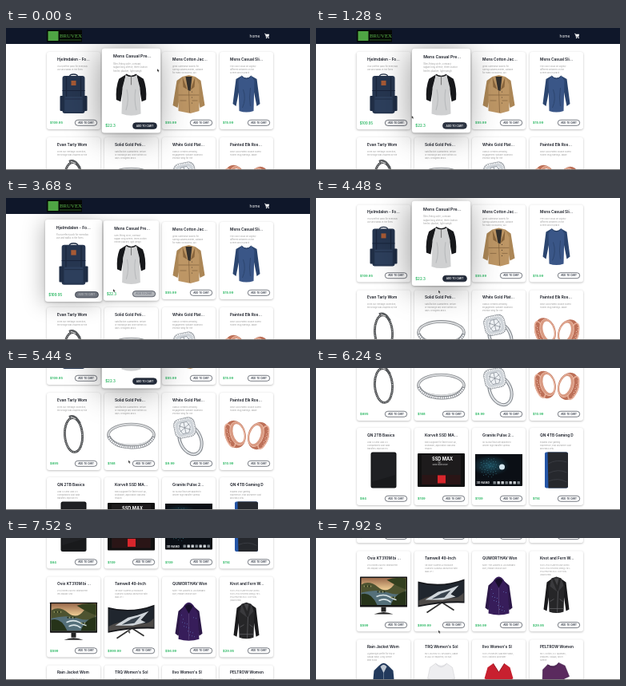
An HTML page that plays this animation: 380 px wide and 178 px high, repeating every 8 s.

```html
<!DOCTYPE html>
<html lang="en">
<head>
<meta charset="utf-8">
<title>Shop grid</title>
<style>
  html, body { margin: 0; width: 100%; height: 100%; overflow: hidden; background: #fff; }
  #stage { position: relative; width: 380px; height: 178px; overflow: hidden; background: #fff; font-family: Inter, "Open Sans", sans-serif; }
  #page { position: absolute; left: 0; top: 0; width: 380px; }
  #nav { position: absolute; left: 0; top: 0; z-index: 2; }
  .card { position: absolute; width: 67px; background: #fff; border-radius: 3px; }
  svg { display: block; overflow: visible; }
  .title { font-size: 4.8px; font-weight: 600; fill: #161a24; }
  .desc { font-size: 2.6px; fill: #999; }
  .price { font-size: 4.1px; font-weight: 600; fill: #1fb45a; }
  .btn { font-size: 2.9px; font-weight: 600; text-anchor: middle; }
  #cursor { position: absolute; left: 0; top: 0; z-index: 3; }
  #edge { position: absolute; left: 0; bottom: 0; width: 380px; height: 1px; background: #777; z-index: 4; }
</style>
</head>
<body>
<div id="stage">
  <div id="page">
    <svg id="nav" width="380" height="20">
      <defs>
        <radialGradient id="glow" cx=".32" cy=".45" r=".4"><stop offset="0" stop-color="#1d4f60"/><stop offset="1" stop-color="#0b0f15"/></radialGradient>
        <linearGradient id="sun" x2="0" y2="1"><stop offset="0" stop-color="#9a6a4c"/><stop offset=".45" stop-color="#f0cf96"/></linearGradient>
      </defs>
      <rect width="380" height="20" fill="#0f172a"/>
      <rect x="51" y="2.5" width="44" height="15" fill="#050805"/>
      <rect x="52.5" y="4" width="13" height="12" fill="#4fa544"/>
      <text x="67" y="12.4" font-family="Liberation Serif, serif" font-size="6.8" fill="#5cb84c">BRUVEX</text>
      <path d="M67 15H94" stroke="#4fa544" stroke-width=".5"/>
      <text x="304.5" y="11.8" font-size="4.9" fill="#fff">home</text>
      <path d="M323 7.3h1.3l1 4h3.2" fill="none" stroke="#fff" stroke-width=".7"/>
      <path d="M324.3 7.8h4.8l-.7 2.9h-3.3z" fill="#fff"/>
      <circle cx="325.6" cy="12.4" r=".7" fill="#fff"/>
      <circle cx="328.2" cy="12.4" r=".7" fill="#fff"/>
    </svg>
  </div>
  <svg id="cursor" width="6" height="6">
    <path id="arrow" d="M0 0V3.8L.9 3 1.6 4.4 2.2 4.1 1.6 2.8H2.8Z" fill="#222" stroke="#fff" stroke-width=".25"/>
    <path id="beam" d="M-.8-1.8H.8M0-1.8V1.8M-.8 1.8H.8" fill="none" stroke="#222" stroke-width=".6"/>
  </svg>
  <div id="edge"></div>
</div>
<script>
const LOOP = 8000;
const path = (d, fill, stroke = 'none', w = 0.6) =>
  `<path d="${d}" fill="${fill}" stroke="${stroke}" stroke-width="${w}"/>`;
const box = (x, y, w, h, fill, r = 0) =>
  `<rect x="${x}" y="${y}" width="${w}" height="${h}" rx="${r}" fill="${fill}"/>`;
const ring = (x, y, rx, ry, stroke, w, extra = '') =>
  `<ellipse cx="${x}" cy="${y}" rx="${rx}" ry="${ry}" fill="none" stroke="${stroke}" stroke-width="${w}" ${extra}/>`;
const dot = (x, y, r, fill) => `<circle cx="${x}" cy="${y}" r="${r}" fill="${fill}"/>`;
const label = (x, y, size, fill, s) =>
  `<text x="${x}" y="${y}" font-size="${size}" font-weight="700" fill="${fill}">${s}</text>`;
const turn = (x, y, deg, body) => `<g transform="translate(${x} ${y}) rotate(${deg})">${body}</g>`;
const many = (n, f) => Array.from({ length: n }, (_, i) => f(i)).join('');

// Pictures are drawn around their own centre.
const art = {
  pack: () => path('M-5-22Q-5-25 0-25T5-22', 'none', '#1d2b42', 1.3) +
    box(-14, -23, 28, 47, '#263650', 3) + box(-17, 2, 5, 19, '#1f2d45', 1) + box(12, 2, 5, 19, '#1f2d45', 1) +
    box(-14, -5, 28, 1, '#18233a') + box(-11, 3, 22, 19, '#2d3f5c', 1.5) +
    path('M-9-22V3M9-22V3', 'none', '#1a263c', 1.2) + box(-3, -17, 6, 6, '#a65a35') +
    path('M-11 6H11', 'none', '#18233a'),
  raglan: () => path('M-6-23L-14-18Q-18-8-17 6L-12 8-10-4ZM6-23L14-18Q18-8 17 6L12 8 10-4Z', '#17181b') +
    path('M-6-23Q0-20 6-23L10-8 11 22Q0 26-11 22L-10-8Z', '#cfd0d1') +
    path('M-6-23Q0-19 6-23', 'none', '#17181b', 1.4) + path('M0-21V-11', 'none', '#777', 1) +
    path('M-5-6Q-2 6-6 18M5-6Q3 6 6 18', 'none', '#b8babc', 1),
  coat: () => path('M-8-22L-15-17-20 14-14 17-11 2ZM8-22L15-17 20 14 14 17 11 2Z', '#ab8656') +
    path('M-8-22L0-24 8-22 13-12 13 21 2 24-13 21-13-12Z', '#bd9665') +
    path('M-4-22H4L2-4-1-5Z', '#33302d') + path('M-8-22L-2-6-7-9ZM8-22L2-5 7-9Z', '#8a663d') +
    path('M0-5L1 23M-11 8H-3M4 8H11M-13 1H13', 'none', '#80613d', .7) + many(3, i => dot(4, -3 + i * 7, .6, '#543')),
  sweater: () => path('M-6-23L-13-19-17 12-13 15-9-5ZM6-23L13-19 17 12 13 15 9-5Z', '#2b456f') +
    path('M-6-23Q0-18 6-23L10-17 9 21Q0 24-9 21L-10-17Z', '#3a5687') +
    path('M-6-23Q0-16 6-23', 'none', '#223758', 1) + path('M-4-6Q0 6-5 17M5-8Q3 5 5 15', 'none', '#2d466f', 1),
  bracelet: () => turn(0, 0, -4, ring(0, 0, 11, 21.5, '#3c3e40', 2.8) +
    ring(0, 0, 11, 21.5, '#b9bbbd', 1.6, 'stroke-dasharray="1 1.1"') +
    path('M-4-23Q2-25 6-19L9-14', 'none', '#55585b', 3) + path('M-2-23L4-20', 'none', '#d5d5d5', 1)),
  band: () => ring(0, 0, 28.5, 13.5, '#8b8e92', 3.6) + ring(0, -.4, 28.3, 13, '#d9dbdd', 2) +
    path('M-28 2Q-22 15 0 15.5T28 2', 'none', '#82868b', 4.2) +
    `<path d="M-28 3Q-21 15 0 15.5T28 3" fill="none" stroke="#f7f8fa" stroke-width="2.4" stroke-dasharray="1.8 .8"/>`,
  diamond: () => turn(2, 6, -24, ring(0, 0, 13, 19, '#80858b', 4) + ring(0, 0, 13, 19, '#dfe2e5', 2)) +
    turn(-5, -9, -12, box(-13.5, -12.5, 27, 25, '#8a9097', 8) +
      `<rect x="-12" y="-11" width="24" height="22" rx="7" fill="#cfd4d9" stroke="#fff" stroke-width="2" stroke-dasharray="1.2 1"/>` +
      box(-8, -7.5, 16, 15, '#eef1f4', 5) + path('M-7-4L7 4M-7 4L7-4M0-7V7M-4-7L-7 0-4 7 4 7 7 0 4-7Z', 'none', '#737b84', .6)),
  rose: () => [[-14, -1, -16, 3], [15, 1, 18, -3]].map(([x, y, deg, dx]) => turn(x, y, deg,
    `<ellipse rx="13" ry="17.5" fill="#bd7058"/>` + ring(-dx * 2.2, 0, 5.5, 15, '#e8b09a', 1.6) +
    `<ellipse cx="${dx}" rx="8.6" ry="14.5" fill="#d99a82"/><ellipse cx="${dx * 1.4}" rx="6.6" ry="12" fill="#fff"/>` +
    ring(dx, 0, 9, 15, '#f0c1ac', .9) + many(9, i => dot(-dx * 3 + i % 2, -10 + i * 2.5, .6, '#f3cdbd')))).join(''),
  drive: () => box(-16, -22.5, 32, 45, '#131416', 2.5) + box(-14.5, -21.5, 29, 43, '#1f2023', 2) +
    path('M-15 15L15 6V21H-15Z', '#191a1c'),
  ssd: () => box(-29.5, -21, 59, 42, '#111', 1) + box(-24.5, -19, 49, 37, '#1d1b1c') + path('M-24 6H24V18H-24Z', '#2a1516') +
    label(-11.5, -11.8, 5.6, '#fff', 'SSD MAX') + label(-11, -6, 2.4, '#aaa', 'Solid State Drive') + box(-4.5, 6.5, 10, 10, '#d8262c'),
  blue: () => box(-29.5, -20, 59, 40, '#0b0f15', 1) + box(-29.5, -20, 59, 32, 'url(#glow)') +
    many(44, i => dot(-12 + Math.sin(i * 2.4) * Math.sqrt(i) * 1.9, -3 + Math.cos(i * 2.4) * Math.sqrt(i) * 1.9, .4, '#58b3c6')) +
    dot(4, -4, 3.5, '#d5e6ee') + label(-28, 17.4, 3.6, '#e8eaec', '3D NAND') +
    many(7, i => box(-7 + i * 5, 14, 3.4, 3.6, i % 3 ? '#c9ced2' : '#7f878d', .5)),
  game: () => box(-14.5, -22.5, 29, 45, '#2455a6', 2) + path('M-11-22.5H12Q14.5-22.5 14.5-20V20Q14.5 22.5 12 22.5H-10Z', '#26282d') +
    path('M-10-8Q0-14 13-10M-10 4Q2-2 13 3M-10 14Q2 9 13 15', 'none', '#3b3e44', .9),
  screen: () => box(-29.5, -24, 59, 38, '#141414', .6) + box(-28, -22.5, 56, 34, 'url(#sun)') +
    path('M-28-14Q-18-20-7-11T13-14 28-20V2H-28Z', '#4d5330') + path('M-28-4Q-8-9 6-4T28-7V11.5H-28Z', '#55707a') +
    path('M-28-2Q-16-6-8 11.5H-28ZM28-6Q14-3 9 11.5H28Z', '#263319') + path('M4-20Q14-24 28-22V-8Q16-12 4-20Z', '#34401f') +
    path('M-9 1Q0-3 7 1T16 5M-6 6Q2 2 9 8', 'none', '#dbe6e8', 1.6) + many(14, i => dot(-24 + i * 17 % 49, -12 + i * 7 % 21, 1, i % 2 ? '#1f2a16' : '#8c8f5b')) +
    box(-3, 14, 6, 6, '#222') + path('M-12 23Q0 18 12 23Z', '#222'),
  curve: () => path('M-29-18Q0-10 29-21V9Q0 8-29 14Z', '#15161a') + path('M-28-16Q0-9 28-19V7Q0 6-28 12Z', '#20262e') +
    path('M-28 6Q-8-4 6 1T28-4V7Q0 6-28 12Z', '#4d4a48') + path('M-20 5L-4-5 8-8 22-13 12-2 18 1 2 5Z', '#cfd5da') +
    path('M-12 4L0-3 12-7 4 2Z', '#39434d') + path('M0 9L-18 21M2 9L16 18', 'none', '#333', 1.7),
  violet: () => path('M-5-20L-13-13-17 15-13 18-9 0ZM5-20L13-13 17 15 13 18 9 0Z', '#2c1848') +
    path('M-6-20Q0-28 6-20L11-10 13 22Q0 26-13 22L-11-10Z', '#371d5a') + path('M-5-19Q0-25 5-19L0-10Z', '#180e2b') +
    path('M0-10V23', 'none', '#655082', .6) + many(16, i => dot(-9 + i * 7 % 19, -8 + i * 11 % 28, .5, '#5d70b5')),
  leather: () => path('M-5-22L-12-17-16 17-12 19-9-2ZM5-22L12-17 16 17 12 19 9-2Z', '#1a1a1c') +
    path('M-6-22L0-24 6-22 10-12 9 20Q0 23-9 20L-10-12Z', '#262628') +
    path('M-6-22L-8-12 1-5ZM6-22L9-13 2-5Z', '#3a3a3d') + path('M2-6L1 21M-8 7L-3 4M8 7L4 4M-9 16H9', 'none', '#707074', .6) +
    path('M-3-22H3L1-13Z', '#454548'),
  rain: () => path('M-6-20Q0-27 6-20L12-14 15 18H-15L-12-14Z', '#22395c') + path('M-4-19Q0-24 4-19L0-11Z', '#bfc8d3') + path('M0-12V18', 'none', '#93a3b8', .6),
  tee: (c = '#eeeef0', s = '#d2d2d6') => path('M-7-23L-14-18-17-4-10-2-10 22H10V-2L17-4 14-18 7-23Q0-17-7-23Z', c, s, .6) + path('M-7-23Q0-14 7-23', 'none', s, .8),
  red: () => path('M-7-23L-14-18-18-4-11-1-10 22H10L11-1 18-4 14-18 7-23 0-12Z', '#c8202f') + path('M-7-23L0-12 7-23', 'none', '#8f1420', .9),
  plum: () => turn(0, 0, -10, art.tee('#5a2a5e', '#43204a'))
};

// title, price, picture, description lines split by |
const rows = [
  [['Hjelmdalen - Fo...', '109.95', 'pack', 'Your perfect pack for everyday|use and walks in the fores'],
   ['Mens Casual Pre...', '22.3', 'raglan', 'Slim-fitting style, contrast|raglan long sleeve, three-button|henley placket, light weigh'],
   ['Mens Cotton Jac...', '55.99', 'coat', 'great outerwear jackets for|Spring/Autumn/Winter, suitable|for many occasions, suc'],
   ['Mens Casual Sli...', '15.99', 'sweater', 'The color could be slightly|different between on the|screen and in practi']],
  [['Evan Tarly Wom', '695', 'bracelet', 'From our Heritage Collection,|the design was inspired by the'],
   ['Solid Gold Peti...', '168', 'band', 'Satisfaction Guaranteed. Return|or exchange any order within 30|days. Designed and s'],
   ['White Gold Plat...', '9.99', 'diamond', 'Classic Created Wedding|Engagement Solitaire Diamond|Promise Ring for Her'],
   ['Painted Elk Ros...', '10.99', 'rose', 'Rose Gold Plated Double Flared|Tunnel Plug Earrings. Made']],
  [['QN 2TB Basics', '64', 'drive', 'USB 3.0 and USB 2.0|Compatibility Fast data|transfers Improve PC'],
   ['Korvelt SSD MA...', '109', 'ssd', 'Easy upgrade for faster boot up,|shutdown, application load and|respon'],
   ['Granite Pulse 2...', '109', 'blue', '3D NAND flash are applied to|deliver high transfer speeds'],
   ['QN 4TB Gaming D', '114', 'game', 'Expand your gaming|experience, Play anywhere Fast|and easy setu']],
  [['Ovix KT310M bi ...', '599', 'screen', '21.5 inches Full HD widescreen|IPS display And'],
   ['Tamwell 49-Inch', '999.99', 'curve', '49 INCH SUPER ULTRAWIDE|CURVED GAMING MONITOR with|dual 27 i'],
   ['QUMORTHAV Won', '56.99', 'violet', 'Note: The Jackets is US standard|size, Please choose size'],
   ['Knot and Fern W...', '29.95', 'leather', '100% POLYURETHANE (shell)|100% POLYESTER (lining) 75%|POLYESTER 25% COTTON|(SWEATER)']],
  [['Rain Jacket Wom', '39.99', 'rain', 'Lightweight perfet for trip or|casual wear, Long sleeve|with hood'],
   ["TRQ Women's Sol", '9.85', 'tee', '95% RAYON 5% SPANDEX, Made|in USA or Imported, Do Not'],
   ["Ilvo Women's Sl", '7.95', 'red', '100% Polyester, Machine wash,|100% cationic polyester'],
   ['PELTROW Women', '12.99', 'plum', '95% Cotton, 5% Spandex,|Features: Casual, Short|Sleeve']]
];
const tops = [30, 136.5, 243, 349.5, 460.5];
const page = document.getElementById('page');

function makeCard(item, r, c) {
  const [title, price, pic, text] = item;
  const extra = r === 3 ? 4 : 0, h = 97 + extra;
  const el = document.createElement('div');
  el.className = 'card';
  el.style.cssText = `left:${51 + c * 72}px;top:${tops[r]}px;height:${h}px`;
  el.innerHTML = `<svg width="67" height="${h}">
    <text class="title" x="13" y="11">${title}</text>
    ${text.split('|').map((s, i) => `<text class="desc" x="13" y="${18.8 + i * 3.9}">${s}</text>`).join('')}
    <g transform="translate(33.5 ${53 + extra * 0.8})">${art[pic]()}</g>
    <text class="price" x="4" y="${90.4 + extra}">$${price}</text>
    <rect x="35.3" y="${85.3 + extra}" width="27.4" height="7" rx="3.5" stroke="#1c2230" stroke-width=".6"/>
    <text class="btn" x="49" y="${89.9 + extra}">ADD TO CART</text></svg>`;
  page.append(el);
  const fill = el.querySelector('svg > rect'), caption = el.querySelector('.btn');
  const dark = [34, 42, 57], white = [255, 255, 255];
  return v => {
    const mix = (a, b) => `rgb(${a.map((n, i) => n + (b[i] - n) * v)})`;
    el.style.transform = `scale(${1 + 0.095 * v})`;
    el.style.zIndex = v > 0 ? 1 : 0;
    el.style.boxShadow = `0 .8px 2.5px rgba(0,0,0,.28), -3px 2px ${38 * v}px rgba(0,0,0,${0.4 * v})`;
    fill.setAttribute('fill', mix(white, dark));
    caption.setAttribute('fill', mix(dark, white));
  };
}
const setHover = rows.map((row, r) => row.map((item, c) => makeCard(item, r, c)));

const ease = k => k * k * (3 - 2 * k);
function track(keys, t, curve = k => k) {
  let i = 0;
  while (i < keys.length - 2 && t >= keys[i + 1][0]) i++;
  const [a, x] = keys[i], [b, y] = keys[i + 1];
  return x + (y - x) * curve(Math.min(1, Math.max(0, (t - a) / (b - a))));
}
const scroll = [[3920, 0], [4160, 8], [4320, 8], [4480, 21.5], [5120, 84], [5440, 106], [5600, 109], [5840, 109],
  [6240, 168], [6400, 177], [6560, 177], [6960, 254.5], [7360, 295], [7440, 295], [7920, 333.7], [8000, 333.7]];
const first = [[1240, 0], [1540, 1], [3560, 1], [3860, 0]];
const second = [[1240, 1], [1540, 0], [3560, 0], [3860, 1], [5600, 1], [5840, 0]];
const curX = [[0, 189], [160, 187], [320, 184], [1120, 168], [1300, 118], [2000, 102], [2400, 100], [2640, 100], [3440, 112], [3900, 153]];
const curY = [[0, 51], [160, 55], [320, 62], [1120, 104], [1300, 110], [2000, 119], [2400, 121], [2640, 121], [3440, 112], [3900, 115.5]];
const cursor = document.getElementById('cursor');
const arrow = document.getElementById('arrow'), beam = document.getElementById('beam');

function draw(t) {
  page.style.transform = `translateY(${-track(scroll, t)}px)`;
  setHover[0][0](track(first, t, ease));
  setHover[0][1](track(second, t, ease));
  cursor.style.transform = `translate(${track(curX, t, ease)}px, ${track(curY, t, ease)}px)`;
  const overText = t > 6880 && t < 7040;
  arrow.style.display = overText ? 'none' : '';
  beam.style.display = overText ? '' : 'none';
}
setHover.flat().forEach(f => f(0));
const start = performance.now();
function tick() {
  draw((performance.now() - start) % LOOP);
  requestAnimationFrame(tick);
}
draw(0);
requestAnimationFrame(tick);
</script>
</body>
</html>
```
